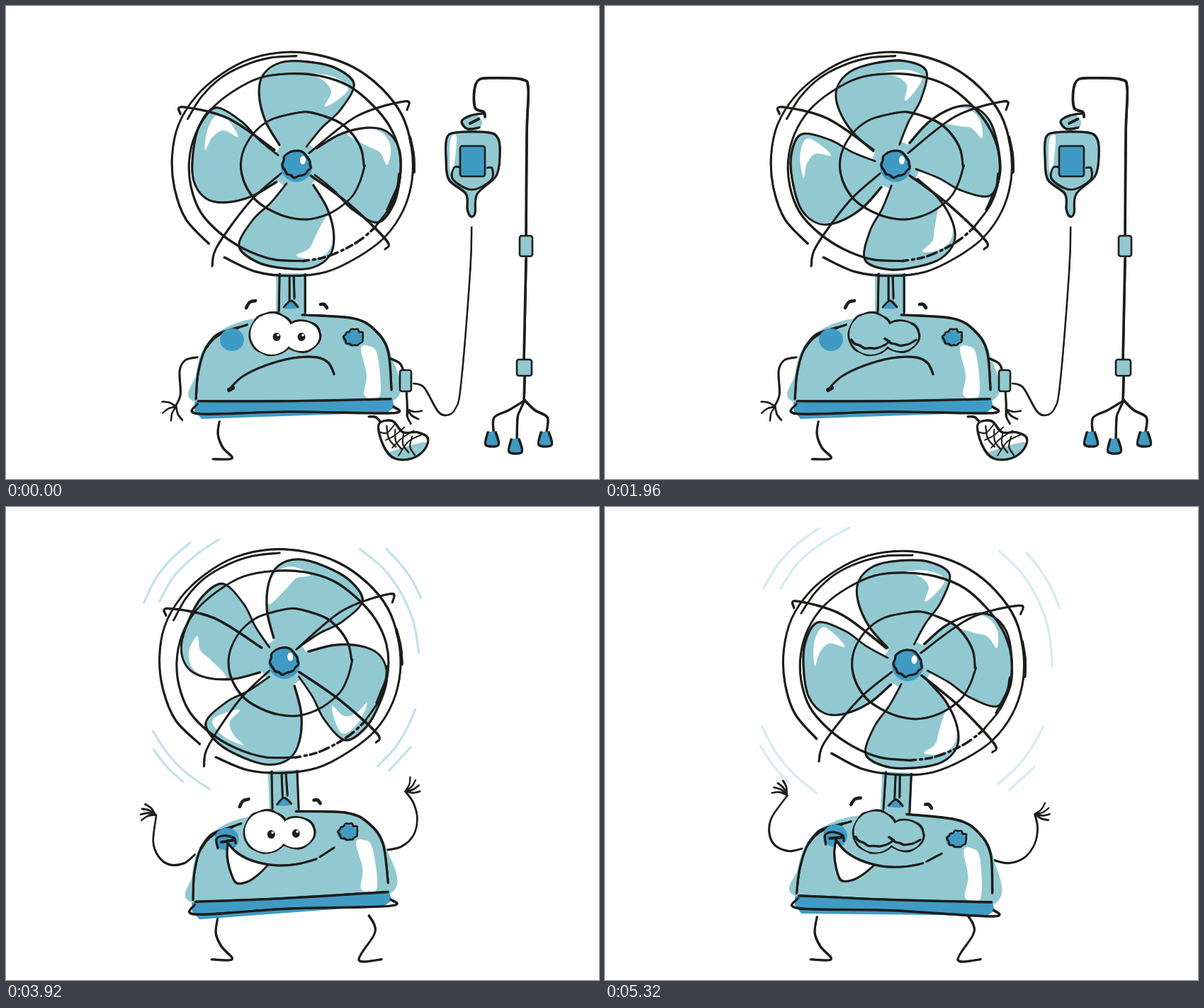
Recreate the animation shown at these times as an HTML page. Size 837 px wide and 669 px high, loop 5600 ms.

```html
<!DOCTYPE html>
<html lang="en">
<head>
<meta charset="utf-8">
<title>Fan recovery</title>
<style>
  html, body { margin: 0; width: 100%; height: 100%; overflow: hidden; background: #fefefe; }
  svg { display: block; width: 100%; height: 100%; }
  .ink { fill: none; stroke: #1d1d1b; stroke-linecap: round; stroke-linejoin: round; }
</style>
</head>
<body>
<svg id="stage" viewBox="0 0 837 669"></svg>
<script>
const TEAL = "#92c9d1", BLUE = "#409bc4", WHITE = "#fefefe", DARK = "#1d1d1b", BREEZE = "#bfe1ea";
const STEP = 280, LOOP = 5600, SICK_STEPS = 10;
const HUB = [410, 225], FOOT = "408 560";

let seed = 7;
const random = () => (seed = seed * 16807 % 2147483647) / 2147483647;
const clamp = (v, low, high) => Math.max(low, Math.min(high, v));
const polar = (cx, cy, rx, ry, deg) =>
  [cx + rx * Math.cos(deg * Math.PI / 180), cy + ry * Math.sin(deg * Math.PI / 180)];

// Smooth curve through points, given as an array or as "x,y x,y ..."
function curve(points, closed = false) {
  const p = typeof points === "string" ? points.split(" ").map(s => s.split(",").map(Number)) : points;
  const n = p.length;
  const at = i => closed ? p[(i + n) % n] : p[clamp(i, 0, n - 1)];
  let d = `M${p[0]}`;
  for (let i = 0; i < (closed ? n : n - 1); i++) {
    const [a, b, c, e] = [at(i - 1), at(i), at(i + 1), at(i + 2)];
    const h1 = [0, 1].map(k => b[k] + (c[k] - a[k]) / 6);
    const h2 = [0, 1].map(k => c[k] - (e[k] - b[k]) / 6);
    d += `C${h1} ${h2} ${c}`;
  }
  return d + (closed ? "Z" : "");
}
// Hand-drawn arc: sampled points with a little wobble
function arc(cx, cy, rx, ry, from, to, wobble = 1.5) {
  const count = Math.ceil(Math.abs(to - from) / 18) + 1;
  return Array.from({ length: count + 1 }, (_, i) => {
    const shake = (random() - .5) * 2 * wobble;
    return polar(cx, cy, rx + shake, ry + shake, from + (to - from) * i / count);
  });
}

const group = (id, body, extra = "") => `<g id="${id}" ${extra}>${body}</g>`;
const fill = (color, points) => `<path fill="${color}" d="${curve(points, true)}"/>`;
const poly = (color, points) => `<polygon fill="${color}" points="${points}"/>`;
const oval = (color, x, y, rx, ry = rx) => `<ellipse fill="${color}" cx="${x}" cy="${y}" rx="${rx}" ry="${ry}"/>`;
// Two slightly offset passes give the line a brushed weight
const ink = (points, w = 3, closed = false) => {
  const d = curve(points, closed);
  return `<path class="ink" stroke-width="${w}" d="${d}"/>` +
    `<path class="ink" stroke-width="${w * .6}" d="${d}" transform="translate(.8 -.9)"/>`;
};
const inks = (list, w) => list.map(points => ink(points, w)).join("");
const box = (color, x, y, w, h) =>
  `<rect x="${x}" y="${y}" width="${w}" height="${h}" rx="3" fill="${color}" stroke="${DARK}" stroke-width="2.6"/>`;
const hand = (x, y, from, to, fingers = 4) => Array.from({ length: fingers }, (_, i) => {
  const angle = from + (to - from) * i / (fingers - 1);
  return ink([[x, y], polar(x, y, 11, 11, angle + 12), polar(x, y, 21, 21, angle)], 2.2);
}).join("");

// One blade pointing up from the hub, with its shine on either side
const bladeEdge = "-24,-28 -44,-62 -53,-100 -47,-128 -22,-145 15,-146 55,-137 81,-114 62,-78 36,-53 14,-26";
const shines = [
  "21,-129 45,-127 64,-119 73,-107 58,-92 40,-83 49,-103 39,-119",
  "-44,-72 -52,-97 -45,-122 -24,-133 0,-128 -18,-118 -27,-100"
];
const eachBlade = draw => [0, 1, 2, 3].map(i => `<g transform="rotate(${i * 90})">${draw(i)}</g>`).join("");
const rotor = `<g transform="translate(${HUB})">` + oval(TEAL, 0, 0, 34) +
  eachBlade(() => fill(TEAL, bladeEdge + " 0,0")) +
  eachBlade(i => fill(WHITE, shines[i === 1 || i === 2 ? 1 : 0]) + ink(bladeEdge, 2.8)) + "</g>";

const guard = inks([
  arc(404, 224, 171, 158, 134, 484),
  arc(404, 224, 164, 153, 205, 272),
  arc(407, 228, 150, 132, 85, 400),
  arc(418, 226, 87, 75, 0, 360)
], 2.8) + inks([arc(404, 224, 171, 158, -14, 4), arc(404, 226, 152, 132, 5, 28)], 4) +
  `<path class="ink" stroke-width="3.6" stroke-dasharray="9 5 3 6 14 5" d="${curve(arc(407, 228, 150, 132, 40, 85))}"/>` +
  inks([
    "246,153 249,143 313,159 379,204",
    "566,147 563,135 495,156 428,208",
    "291,368 298,340 344,277 388,237",
    "535,344 537,332 486,282 430,240"
  ], 3);
const hub = oval(BLUE, 410, 227, 22) + ink(arc(410, 224, 20, 18, 0, 345), 3, true) + oval(WHITE, 419, 218, 4, 6);

const neck = poly(TEAL, "381,378 424,378 424,440 381,440") +
  inks(["386,379 385,432", "422,380 422,434", "400,382 400,416", "406,382 407,414"], 2.8) +
  fill(BLUE, "391,427 402,416 412,427") + ink("392,426 402,417 412,426", 2.6);

const base = fill(TEAL, "267,560 268,522 278,486 302,460 345,443 420,437 488,440 523,458 543,492 547,558 400,570") +
  fill(WHITE, "501,485 512,481 524,493 528,550 506,551 509,522") +
  poly(BLUE, "266,560 545,554 548,568 538,575 276,584 266,572") +
  inks(["268,556 271,520 281,486 301,465 340,451", "418,437 490,442 521,459 539,488 544,543",
    "271,559 400,559 543,556", "270,563 272,577 400,574 544,576 547,567"], 3.2) +
  ink("282,484 298,465 328,455", 4) +
  oval(BLUE, 319, 472, 17, 16) + oval(BLUE, 489, 470, 14, 11) + ink(arc(491, 469, 14, 11, 0, 340), 2.4, true) +
  ink("339,427 344,419 352,417", 4.5) + ink("444,422 449,422 453,427", 4.5);

// Eyes share one rim, so the whites run together in the middle
const sockets = [[375, 464, 31, 30], [417, 467, 26, 22]];
const eachEye = draw => sockets.map(eye => draw(...eye)).join("");
const rims = eachEye((x, y, rx, ry) => ink(arc(x, y, rx, ry, 0, 350, .8), 3, true));
const balls = color => eachEye((x, y, rx, ry) => oval(color, x, y, rx - 1, ry - 1));
const pupils = [382, 417].map(x => oval(DARK, x, 468, 5.5, 6) + oval(WHITE, x + 2, 465.5, 1.8)).join("");
const lid = (x, y, rx, ry) => `<path d="M${x - rx} ${y}A${rx} ${ry} 0 0 1 ${x + rx} ${y}Q${x} ${y - 8} ${x - rx} ${y}Z"
  fill="${TEAL}" stroke="${DARK}" stroke-width="3"/>`;
const eyes =
  group("open", rims + balls(WHITE) + group("pupils", pupils)) +
  group("half", rims + balls(WHITE) + pupils + eachEye(lid)) +
  group("shut", rims + balls(TEAL) + eachEye((x, y, rx, ry) => ink(arc(x, y - 6, rx, ry - 3, 150, 35), 3)));

const sad = ink("315,542 334,524 365,509 405,498 438,497 455,505 463,521", 3) + ink("315,543 320,540", 6) +
  inks(["270,497 253,501 245,516 246,550 238,568", "543,499 556,506 561,517", "565,545 566,562 566,580"], 2.8) +
  hand(240, 567, 200, 65) + hand(566, 571, 5, 75, 3) + box(TEAL, 556, 515, 16, 30);

const sickFeet = ink("301,588 299,606 306,625 319,640 292,641") + ink("512,581 522,582 531,592") +
  fill(WHITE, "526,592 545,587 560,603 580,603 595,611 591,627 573,640 548,640 532,621") +
  fill(TEAL, "540,632 590,617 591,628 574,639 550,640") +
  ink("526,592 545,587 560,603 580,603 595,611 591,627 573,640 548,640 532,621", 3, true) +
  [0, 1, 2, 3].map(i => inks([
    `${527 + i * 9},${603 + i * 11} ${538 + i * 10},${604 + i * 4} ${549 + i * 13},${591 + i * 5}`,
    `${537 + i * 12},${594 + i * 5} ${540 + i * 10},${612 + i * 4} ${550 + i * 9},${624 + i * 4}`
  ], 1.7)).join("");

const casters = [[686, 612], [719, 622], [761, 612]].map(([x, y]) =>
  ink([[732, 558], [(x + 732) / 2, 572], [x + 3, 582], [x + 2, y - 10]], 3.2) +
  poly(BLUE, `${x - 7},${y - 10} ${x + 6},${y - 10} ${x + 10},${y + 9} ${x - 8},${y + 10}`) +
  ink([[x - 6, y - 9], [x - 9, y + 9], [x + 9, y + 9], [x + 5, y - 9]], 3.2)).join("");
const bagEdge = "622,187 636,179 680,179 694,187 697,208 692,240 665,266 662,293 656,298 651,288 649,266 625,246 621,218";
const dripStand = ink("575,534 590,540 609,573 622,579 634,570 642,535 655,375 657,313", 2.2) +
  inks(["676,157 674,150 662,144 661,119 668,104 690,102 728,104 737,117 735,180 734,324",
    "734,357 731,499", "732,524 731,560"], 3.6) + casters +
  box(TEAL, 725, 325, 18, 29) + box(TEAL, 721, 500, 21, 23) +
  oval(TEAL, 658, 165, 14, 12) + ink("674,152 656,155 643,163 651,174 668,172", 3) + ink("655,166 667,160", 4) +
  fill(TEAL, bagEdge) + fill(WHITE, "627,190 636,185 632,229 627,233") + ink(bagEdge, 3, true) +
  box(BLUE, 641, 198, 35, 43) + ink("640,228 632,229 631,246 657,260 684,247 686,230 679,229", 2.6);

// Ticks burst from the corners around each vanishing thing
const sparkSpots = [[733, 104, 52, 40], [658, 214, 70, 58], [738, 338, 46, 40], [735, 512, 46, 40], [723, 599, 76, 64], [557, 613, 54, 46]];
const sparks = sparkSpots.map(([cx, cy, rx, ry]) => Array.from({ length: 10 }, (_, i) => {
  const angle = 45 + i * 90 + (random() - .5) * 45;
  return `<ellipse fill="${BLUE}" rx="3.8" ry="1.1"
    transform="translate(${polar(cx, cy, rx, ry, angle)}) rotate(${angle})"/>`;
}).join("")).join("");

const glad = oval(BLUE, 316, 475, 16, 14) +
  fill(WHITE, "317,486 346,505 374,512 356,529 342,538 326,537 318,518") +
  inks(["317,482 316,500 321,523 329,538 345,536 360,526 374,512", "316,481 331,496 353,507 385,513 416,511 442,504", "447,501 467,488"], 3) +
  ink("303,489 301,476 311,471 325,474 328,482", 3) + ink("308,480 326,477", 4);
const arms =
  group("armL", ink("270,498 251,503 231,496 222,479 224,457 243,425", 2.6) + hand(242, 424, 183, 250)) +
  group("armR", ink("541,491 562,497 585,491 601,473 607,451 605,432", 2.6) + hand(605, 431, -42, 30));
const happyLegs = inks(["299,580 296,603 304,622 319,640 290,640", "512,578 520,592 519,606 498,641 530,640"]);

const gusts = [[216, 203, 232], [197, 206, 242], [214, -48, -25], [191, -56, -4],
  [209, 120, 152], [221, 130, 146], [197, 20, 48], [214, 34, 46]];
const air = gusts.map(([r, from, to]) => `<path fill="none" stroke="${BREEZE}" stroke-width="3"
  stroke-linecap="round" d="${curve(arc(396, 225, r, r, from, to, 2))}"/>`).join("");

// Happy parts are drawn as they look on the leaning body
const LEANT = `transform="rotate(2.3 ${FOOT})"`;
document.getElementById("stage").innerHTML =
  group("sparks", sparks) + group("stand", dripStand + sickFeet) + group("legs", happyLegs) +
  group("fan",
    group("lively", group("air", air) + arms, LEANT) +
    neck + group("rotor", rotor) + guard + hub + base +
    group("sad", sad) + group("glad", glad, LEANT) + eyes);

const part = {};
document.querySelectorAll("#stage g[id]").forEach(g => part[g.id] = g);
const show = (id, on) => part[id].style.display = on ? "" : "none";
const move = (id, value) => part[id].setAttribute("transform", value);

function drawSick(step) {
  const look = clamp((3 - Math.abs(step - 4)) / 2, 0, 1);
  move("pupils", `translate(${-1.5 * look} ${-10.5 * look})`);
  move("rotor", `rotate(${44.4 * step + .65 * step * step} ${HUB})`);
  move("fan", "");
}

function drawHappy(beat) {
  const half = Math.floor(beat / 5);
  const lean = clamp(6 * Math.cos(2 * Math.PI * (beat - 2.55) / 5.45) - 1.1, -1, 1);
  const joy = clamp((beat - 1) / 3, 0, 1);
  const wave = joy * (1 - lean) / 2;
  move("pupils", "");
  move("rotor", `rotate(${11 + 47 * (beat % 5) + 148 * half} ${HUB})`);
  move("fan", `translate(${joy * (3 * lean - 1)} ${joy * (1.5 * lean - 4.5)}) rotate(${.15 + 2.45 * lean} ${FOOT})`);
  move("armL", `rotate(${-24 * wave} 270 497)`);
  move("armR", `rotate(${-10 * joy - 19 * wave} 542 492)`);
  move("air", `translate(396 225) scale(${1 + .07 * half}) translate(-396 -225)`);
  part.air.style.opacity = beat ? 1 - .35 * half : 0;
}

function draw(step) {
  const sick = step < SICK_STEPS;
  const lidState = step % 12 === 7 ? "shut" : step === 8 || step === 9 ? "half" : "open";
  ["open", "half", "shut"].forEach(id => show(id, id === lidState));
  ["stand", "sad"].forEach(id => show(id, sick));
  ["legs", "lively", "glad"].forEach(id => show(id, !sick));
  show("sparks", step === SICK_STEPS - 1);
  if (sick) drawSick(step);
  else drawHappy(step - SICK_STEPS);
}

let shown = -1;
function tick() {
  const step = Math.floor(performance.now() % LOOP / STEP);
  if (step !== shown) draw(shown = step);
  requestAnimationFrame(tick);
}
tick();
</script>
</body>
</html>
```
